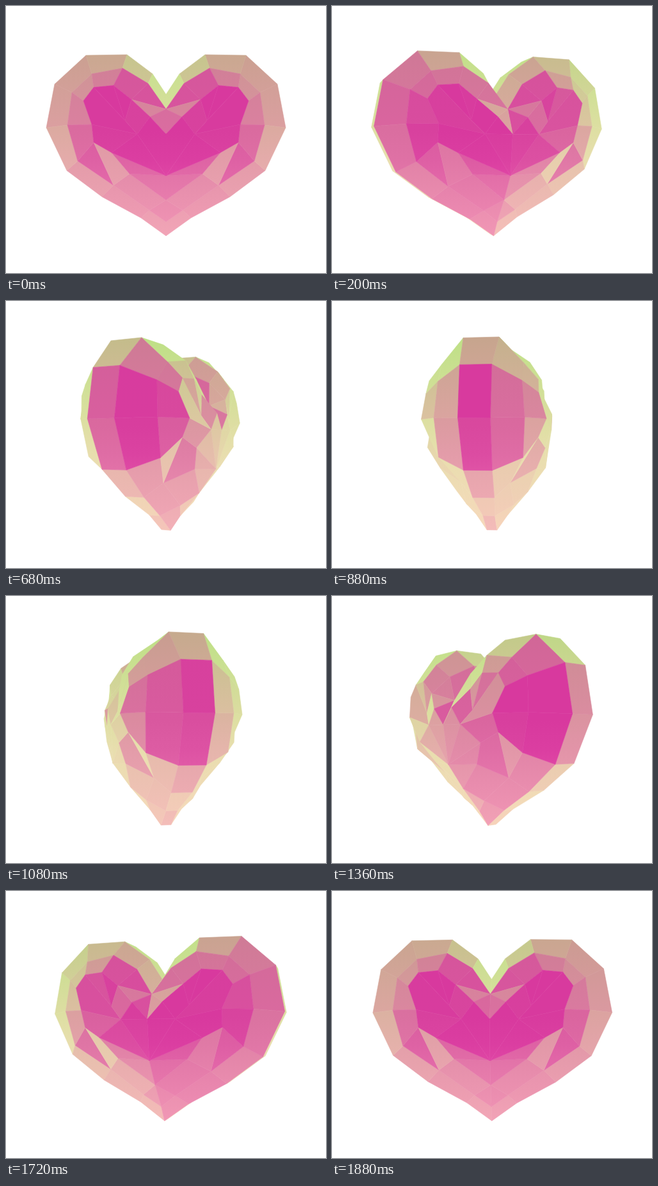
Recreate the animation shown at these times as an HTML page with a canvas. Size 500 px wide and 417 px high, loop 1920 ms.

```html
<!DOCTYPE html>
<html lang="en">
<head>
<meta charset="utf-8">
<title>Turning heart</title>
<style>
  html, body { margin: 0; width: 100%; height: 100%; overflow: hidden; background: #fff; }
  canvas { display: block; }
</style>
</head>
<body>
<canvas id="stage" width="500" height="417"></canvas>
<script>
const ctx = document.getElementById('stage').getContext('2d');
const LOOP = 1920, STEP = 40;
const CX = 250, CY = 220, CAM = 800;

// Left front quarter: distance from the axis and height as seen head-on, then depth.
const points = {
  N: [0, 138, 20], O1: [21, 106, 20], O2: [61, 76, 25], O3: [125, 77, 24],
  O4: [174, 122, 20], O5: [187, 190, 20], O6: [155, 257, 18.5], O7: [100, 298, 15],
  O8: [39, 331, 9], T: [0, 359, 8],
  I1: [28, 121, 62], I2: [68, 97, 62], I3: [116, 106, 56], I4: [147, 135, 55],
  I5: [154, 186, 59], I6: [138, 242, 56], I7: [82, 280, 35],
  J2: [82, 124, 79], J3: [113, 127, 75], J4: [129, 148, 76], J5: [116, 185, 86],
  J6: [113, 213, 75],
  V: [0, 161, 72], S: [54, 146, 80], M: [25, 173, 93], C: [0, 200, 92],
  R: [45, 200, 91], W: [64, 179, 83], Q: [85, 229, 84], U: [57, 262, 71],
  K: [0, 265, 83], D: [0, 303, 56], E: [26, 319, 36], G: [0, 337, 25]
};

const rim = 'N O1 O2 O3 O4 O5 O6 O7 O8 T'.split(' ');
const front = [
  'N O1 I1 V', 'O1 O2 I2 I1', 'O2 O3 I3 I2', 'O3 O4 I4 I3', 'O4 O5 I5 I4',
  'O5 O6 I6 I5', 'O6 O7 I7 I6', 'O7 O8 E I7', 'O8 T G E',
  'I1 I2 J2 S', 'I1 S V', 'I2 I3 J3 J2', 'I3 I4 J4 J3', 'I4 I5 J5 J4',
  'I5 I6 J6 J5', 'I6 I7 J6',
  'J2 J3 W', 'J2 W S', 'S W R M', 'M R C', 'V S M', 'V M C',
  'J3 J4 J5 R W', 'J5 J6 Q R', 'R Q K', 'R K C',
  'J6 I7 U Q', 'Q U K', 'K U D', 'I7 E D U', 'E G D'
];

const sub = (a, b) => a.map((v, i) => v - b[i]);
const add = (a, b) => a.map((v, i) => v + b[i]);
const dot = (a, b) => a[0] * b[0] + a[1] * b[1] + a[2] * b[2];
const cross = (a, b) => [
  a[1] * b[2] - a[2] * b[1],
  a[2] * b[0] - a[0] * b[2],
  a[0] * b[1] - a[1] * b[0]
];
const unit = a => a.map(v => v / Math.hypot(...a));
const flip = (p, sx, sz) => [p[0] * sx, p[1], p[2] * sz];
const center = ps => ps.reduce(add).map(v => v / ps.length);

function vertex(name) {
  const [a, y, z] = points[name];
  const s = 1 - z / CAM;
  return [-a * s, (y - CY) * s, z];
}

// Mean normal of a polygon, turned towards the front.
function frontNormal(ps) {
  const n = unit(ps.map((p, i) => cross(p, ps[(i + 1) % ps.length])).reduce(add));
  return n[2] < 0 ? n.map(v => -v) : n;
}

const faces = [];
function addFace(pts, normal, sx, sz) {
  faces.push({ pts: pts.map(p => flip(p, sx, sz)), normal: flip(normal, sx, sz) });
}

for (const names of front) {
  const p = names.split(' ').map(vertex), n = frontNormal(p);
  for (const sx of [1, -1]) for (const sz of [1, -1]) addFace(p, n, sx, sz);
}

for (let i = 1; i < rim.length; i++) {
  const a = vertex(rim[i - 1]), b = vertex(rim[i]);
  const n = unit([a[1] - b[1], b[0] - a[0], 0]);
  for (const sx of [1, -1]) addFace([a, b, flip(b, 1, -1), flip(a, 1, -1)], n, sx, 1);
}

// Facing planes show the core colour, turned ones the glow; both run from top to bottom.
const shades = [
  { at: 0, core: [216, 57, 158], glow: [190, 224, 134] },
  { at: 0.45, core: [216, 57, 158], glow: [222, 223, 163] },
  { at: 0.6, core: [219, 62, 161], glow: [232, 222, 174] },
  { at: 1, core: [236, 98, 176], glow: [247, 216, 188] }
];

function paint(turned) {
  const g = ctx.createLinearGradient(0, 60, 0, 360);
  for (const { at, core, glow } of shades) {
    const rgb = core.map((c, i) => Math.round(c + (glow[i] - c) * turned));
    g.addColorStop(at, `rgb(${rgb})`);
  }
  return g;
}

function angleAt(ms) {
  const u = ms / (LOOP - STEP);
  return (178.1 * u - 1.15 * Math.sin(2 * Math.PI * u)) * Math.PI / 180;
}

function draw(ms) {
  const angle = angleAt(ms), c = Math.cos(angle), s = Math.sin(angle);
  const turn = ([x, y, z]) => [x * c + z * s, y, z * c - x * s];

  const visible = [];
  for (const face of faces) {
    const pts = face.pts.map(turn);
    const toEye = sub([0, 0, CAM], center(pts));
    const facing = dot(turn(face.normal), unit(toEye));
    if (facing > 0) visible.push({ pts, facing, far: Math.hypot(...toEye) });
  }
  visible.sort((a, b) => b.far - a.far);

  ctx.fillStyle = '#fff';
  ctx.fillRect(0, 0, 500, 417);
  ctx.lineWidth = 0.6;
  ctx.lineJoin = 'round';
  for (const { pts, facing } of visible) {
    const turned = Math.min(1, Math.max(0, (0.95 - facing) * 1.5));
    ctx.beginPath();
    for (const [x, y, z] of pts) {
      const k = CAM / (CAM - z);
      ctx.lineTo(CX + x * k, CY + y * k);
    }
    ctx.closePath();
    ctx.fillStyle = ctx.strokeStyle = paint(turned);
    ctx.fill();
    ctx.stroke();
  }
}

const start = performance.now();
function tick() {
  const ms = (performance.now() - start) % LOOP;
  draw(Math.floor(ms / STEP) * STEP);
  requestAnimationFrame(tick);
}
tick();
</script>
</body>
</html>
```
